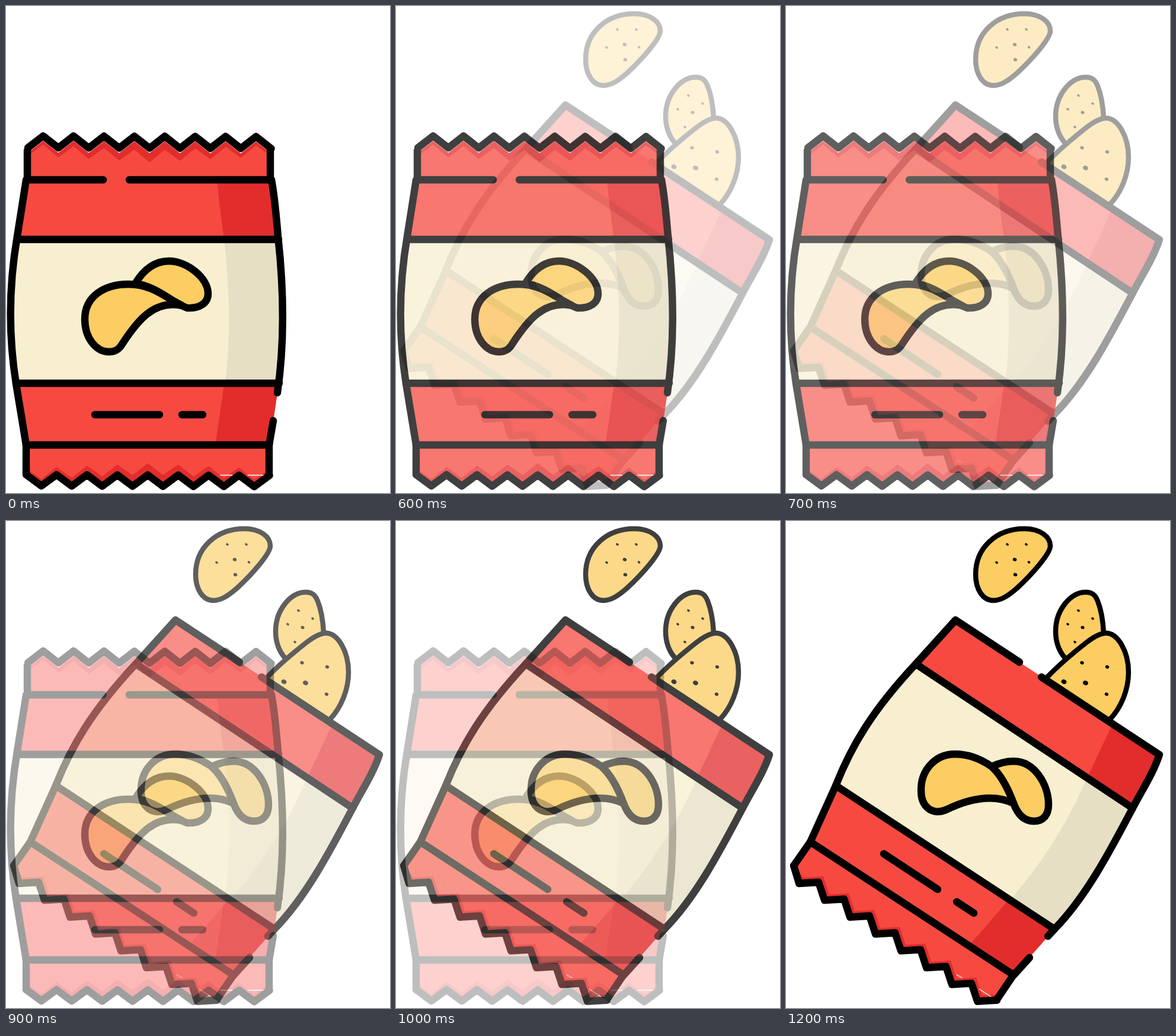
These frames come from a looping animation (648x821 px, 1.7 s). An HTML page with a canvas:

```html
<!DOCTYPE html>
<html lang="en">
<head>
<meta charset="utf-8">
<title>Crisps</title>
<style>
html, body { margin: 0; width: 100%; height: 100%; overflow: hidden; background: #fff; }
canvas { display: block; }
</style>
</head>
<body>
<canvas id="stage" width="648" height="821"></canvas>
<script>
const W = 648, H = 821, LOOP = 1700;
const RED = '#f64a41', DARK = '#e32d2d', CREAM = '#f8efd1', SHADE = '#e6dfc4', CHIP = '#fccd62';

function layer(draw) {
  const c = document.createElement('canvas');
  c.width = W;
  c.height = H;
  const g = c.getContext('2d');
  g.lineCap = g.lineJoin = 'round';
  const fill = (d, color) => {
    g.fillStyle = color;
    g.fill(new Path2D(d));
  };
  const line = (d, width = 12.4, color = '#000') => {
    g.lineWidth = width;
    g.strokeStyle = color;
    g.stroke(new Path2D(d));
  };
  const shape = (d, color, width) => {
    fill(d, color);
    line(d, width);
  };
  // Paint inside an outline only
  const inside = (outline, paint) => {
    g.save();
    g.clip(new Path2D(outline));
    paint();
    g.restore();
  };
  const dots = list => {
    g.fillStyle = '#000';
    for (const [x, y, r] of list) {
      g.beginPath();
      g.ellipse(x, y, r * 1.2, r, 0.4, 0, 7);
      g.fill();
    }
  };
  draw({ fill, line, shape, inside, dots });
  return c;
}

const path = pts => 'M' + pts.map(p => p.map(v => v.toFixed(1)).join(' ')).join('L');

function zigzag(y0, y1, x0) {
  return Array.from({ length: 17 }, (_, i) => [x0 + i * 25.66, (i % 2 ? y1 : y0) + i * 0.08]);
}

// Shift a zigzag vertically, most in the middle of the bag
const arch = (pts, mid, drop) =>
  pts.map(([x, y]) => [x, y + mid - drop * Math.abs(x - 242) / 154]);

const closedBag = layer(({ fill, line, shape, inside }) => {
  const top = zigzag(239, 219, 37);
  const bottom = zigzag(790, 809, 34);
  const lowered = top.map(([x, y]) => [x, y + 8.4]);
  fill(path([...lowered, [446, 300], [36, 300]]) + 'Z', DARK);
  fill(path([[34, 738], [444, 738], ...[...bottom].reverse()]) + 'Z', DARK);
  inside('M36 200H446V300H36Z', () =>
    fill(path([...arch(top, 24, 8), [448, 300], [36, 300]]) + 'Z', RED));
  fill(path([[34, 738], [444, 738], ...arch(bottom, -20, -7).reverse()]) + 'Z', RED);
  line('M362 791H382M408 791H437', 1.3, '#fff');

  const left = 'M34 293L19 388C4 475 4 555 17 637L34 740';
  const right = 'L451 699L458 652C471.5 560 468 470 459 388C456 355 454 325 448 293';
  inside(left + 'H444' + right + 'Z', () => {
    fill('M0 290H480V745H0Z', RED);
    fill('M356 293Q361 345 368 393H480V293ZM368 636Q361 690 353 740H480V636Z', DARK);
    fill('M0 393H480V636H0Z', CREAM);
    fill('M368 393C378 480 379 560 370 636H480V393Z', SHADE);
  });

  line(path(top));
  line(path(bottom));
  line('M36 244V292M446 244V292M34 740V790M444 740V790');
  line(left);
  line('M448 293C454 325 456 355 459 388C468 470 471.5 560 458 652M451 699L444 740');
  line('M36 293H164M208 293H448M20 393.5H460M17 636H461M34 740H444M150 689H259M297 689H332');

  shape('M218 468C235 440 255 430 275 430C305 430 341 458 341 485C341 502 325 510 306 509C296 506 290 501 282 497C262 484 240 470 218 468Z', CHIP);
  shape('M133 528C133 490 165 469 207 469C240 469 262 485 282 497L297 505C250 495 222 530 196 570C190 580 183 583 174 583C152 583 133 560 133 528Z', CHIP);
});

const openBag = layer(({ fill, line, shape, inside, dots }) => {
  shape('M350 134C332 134 320 115 320 90C320 45 355 13 402 13C430 13 446 27 446 42C446 55 415 90 390 113C375 126 363 134 350 134Z', CHIP, 8.5);
  dots([[373.5, 39.5, 2], [405.5, 39.5, 2], [355.5, 70, 2], [386, 65, 2.8], [410, 69.5, 2], [387, 90.5, 2.8]]);
  shape('M470 230C460 218 455 203 455 186C455 150 480 120 506 120C517 120 522 125 526 135C532 150 535 170 536 188', CHIP, 8.5);
  dots([[493.5, 151, 2], [517.5, 164.5, 2], [475.5, 174, 2], [500.5, 179.5, 2.6], [487.5, 204, 2]]);
  shape('M440 264C460 243 485 222 508 204C520 195 530 189 540 189C560 189 578 220 578 255C578 285 565 315 547 334', CHIP, 8.5);
  dots([[499.5, 239, 2.7], [542, 246, 2.7], [469, 271, 3.8], [505.5, 273, 3.8], [541, 292, 2.7]]);

  const teeth = [[13, 581]], shadow = [[13, 581]];
  for (let k = 0; k < 8; k++) {
    const x = k * 43, y = k * 28.4;
    teeth.push([22 + x, 611 + y], [55 + x, 609 + y]);
    shadow.push([30 + x, 601 + y], [63 + x, 599 + y]);
  }
  const leftSide = 'L41 541L84 446C110 380 145 320 219 241L286 167';
  const rightSide = 'L630 394C620 425 600 455 585 484C545 560 505 635 453 688L382 768L355 808';

  inside(path([...teeth].reverse()) + leftSide + rightSide + 'Z', () => {
    fill('M0 0H648V821H0Z', DARK);
    fill(path([...shadow, [382, 768], [648, 700], [648, 100], [0, 100]]) + 'Z', RED);
    fill('M551 342L508 433L585 484L648 484V400ZM376 638Q345 675 308 716L382 766L470 690Z', DARK);
    fill('M219 241L585 484L600 600L453 688L84 446L50 300Z', CREAM);
    fill('M508 433C475 510 430 580 378 639L453 688L600 600L585 484Z', SHADE);
  });
  line('M288 765L297 770M326 789L346 802', 1.3, '#fff');

  line(path(teeth));
  line('M13 581' + leftSide + 'L394 238M431 263' + rightSide.replace('L382 768L355 808', 'L442 700'));
  line('M411 736L382 768L355 808');
  line('M219 241L585 484M84 446L453 688M41 541L382 764M165 561L256 621M288 642L317 661');

  shape('M347 414C360 408 372 405 384 405C420 405 443 445 443 478C443 495 435 506 418 506C400 506 390 492 384 476Z', CHIP);
  shape('M228 455C227 420 252 393 285 393C310 393 330 402 347 414C365 430 377 457 384 476C350 460 310 468 272 486C245 498 228 480 228 455Z', CHIP);
});

const ctx = document.getElementById('stage').getContext('2d');
const start = performance.now();

function frame() {
  const t = (performance.now() - start) % LOOP;
  // Eight hard cross-fade steps, 100 ms apart, from 500 ms on
  const mix = Math.min(8, Math.max(0, Math.floor(t / 100) - 4)) / 8;
  ctx.globalAlpha = 1;
  ctx.fillStyle = '#fff';
  ctx.fillRect(0, 0, W, H);
  ctx.globalAlpha = mix;
  ctx.drawImage(openBag, 0, 0);
  ctx.globalAlpha = 1 - mix;
  ctx.drawImage(closedBag, 0, 0);
  requestAnimationFrame(frame);
}
frame();
</script>
</body>
</html>
```
